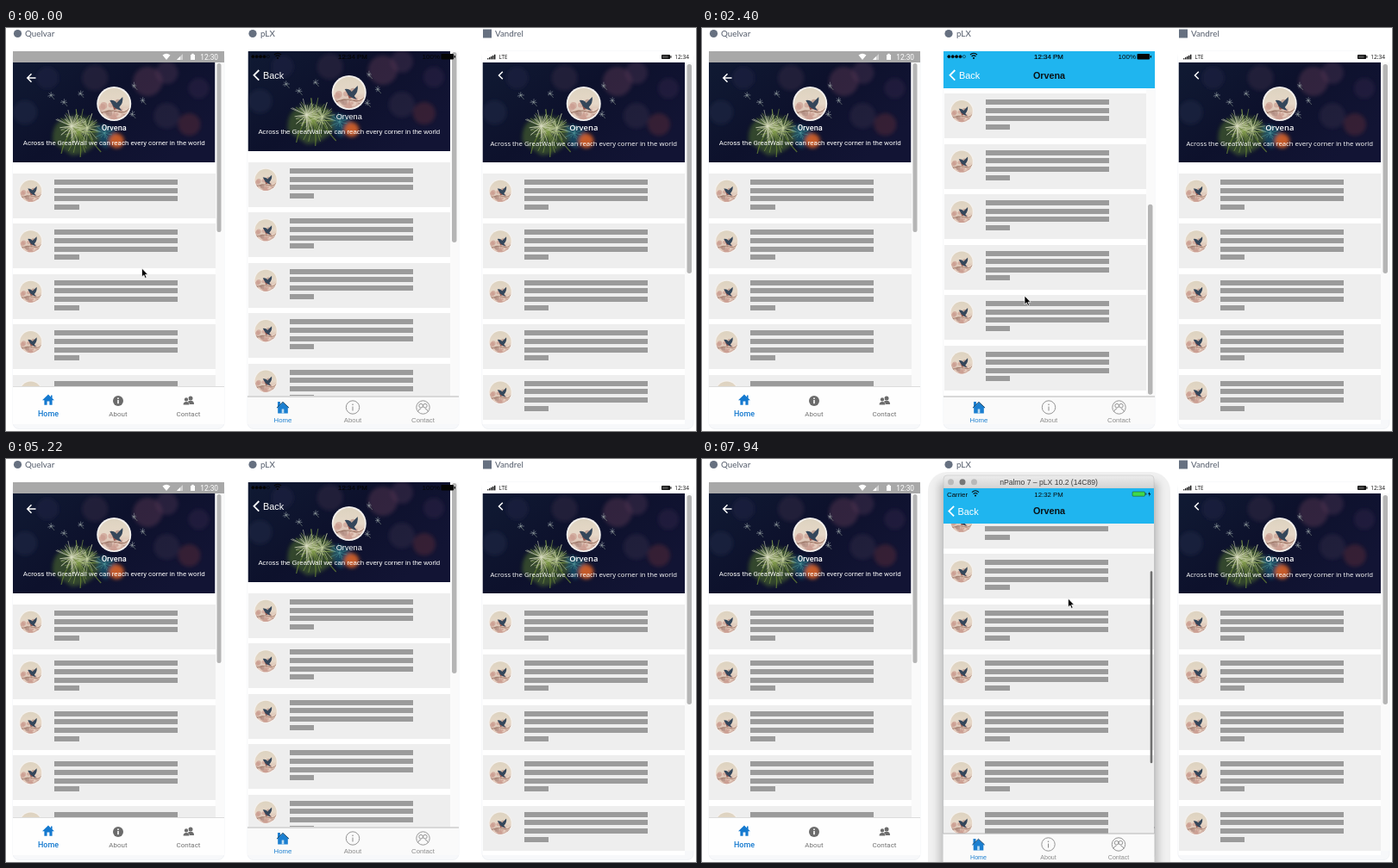
Write an HTML page that moves like this. It is 800 by 468 pixels and loops after 8000 ms.

```html
<!DOCTYPE html>
<html lang="en">
<head>
<meta charset="utf-8">
<title>Profile scroll on three platforms</title>
<style>
  html, body { margin: 0; width: 100%; height: 100%; overflow: hidden; background: #fff; }
  svg { display: block; width: 100vw; height: 100vh; }
  .sans { font-family: "Liberation Sans", Arial, sans-serif; }
  .robo { font-family: Roboto, sans-serif; }
  .open { font-family: "Open Sans", sans-serif; }
  .lato { font-family: Lato, sans-serif; }
</style>
</head>
<body>
<svg id="stage" viewBox="0 0 800 468" xmlns="http://www.w3.org/2000/svg"></svg>
<script>
const LOOP = 8000, STEP = 149, LAST = 53, PITCH = 58.45;
const NAME = 'Orvena';
const CAPTION = 'Across the GreatWall we can reach every corner in the world';

// Column geometry and key poses: [step, value]
const phones = [
  { id: 'a', x: 8, w: 234.5, left: 8, full: 245, top: 40, bottom: 416, font: 'robo', cap: 7.95, capY: 96.2, name: 9.2, weight: 500,
    bar: [40, 36], thumb: [244.5, 5, 41, 196, 0.532],
    scroll: [[2, 0], [3, 40], [4, 190], [5, 310], [6, 338], [7, 320], [8, 200], [9, 60], [10, 0]],
    tint: [[2, 0], [3, .3], [4, 1], [8, 1], [9, .8], [10, .38], [11, .12], [12, 0]] },
  { id: 'i', x: 280.5, w: 234.5, left: 280, full: 245, top: 27, bottom: 427, font: 'sans', cap: 7.85, capY: 96.2, name: 9.2, weight: 400,
    bar: [27, 43], thumb: [517, 5.5, 28, 221, 0.564],
    scroll: [[13, 0], [14, 90], [15, 240], [16, 313.5], [17, 313.5], [18, 290], [19, 180], [20, 60], [21, 0]],
    tint: [[13, 0], [14, .6], [15, 1], [19, 1], [20, .5], [21, 0]] },
  { id: 'w', x: 552.5, w: 234.5, left: 552, full: 245, top: 40, bottom: 460, font: 'open', cap: 7.75, capY: 97.2, name: 9.4, weight: 600,
    bar: [40, 36], thumb: [789.5, 5.5, 42, 243, 0.58],
    scroll: [[23, 0], [24, 2.6], [25, 70], [26, 190], [27, 270], [28, 294], [29, 294], [30, 270], [31, 190], [32, 100], [33, 40], [34, 10], [35, 0]],
    tint: [[24, 0], [25, .6], [26, 1], [32, 1], [33, .5], [34, .1], [35, 0]] },
  { id: 's', x: 280, w: 244, left: 280, full: 244, top: 34, bottom: 435, font: 'sans', cap: 7.62, capY: 96, name: 9.2, weight: 400,
    bar: [34, 41], thumb: [519.7, 2.6, 36, 223, 0.556],
    scroll: [[48, 0], [49, 12], [50, 60], [51, 115], [52, 150], [53, 169.5]],
    tint: [[48, 0], [49, .1], [50, .6], [51, 1]] }
];
const pointer = {
  x: [[0, 157.5], [10, 157.5], [11, 260], [12, 374], [21, 374], [22, 660], [29, 660], [35, 684], [36, 690], [42, 690], [43, 500], [45, 459], [48, 436], [53, 424.5]],
  y: [[0, 279], [1, 283], [10, 283], [11, 300], [12, 311], [21, 311], [22, 338], [29, 338], [34, 440], [35, 470], [42, 480], [43, 320], [45, 268], [48, 310], [53, 162]]
};

let seed = 7;
const rnd = () => (seed = seed * 16807 % 2147483647) / 2147483647;
const rect = (x, y, w, h, fill, more = '') => `<rect x="${x}" y="${y}" width="${w}" height="${h}" fill="${fill}" ${more}/>`;
const dot = (x, y, r, fill, more = '') => `<circle cx="${x}" cy="${y}" r="${r}" fill="${fill}" ${more}/>`;
const path = (d, fill, more = '') => `<path d="${d}" fill="${fill}" ${more}/>`;
const line = (d, color, width, more = '') => path(d, 'none', `stroke="${color}" stroke-width="${width}" ${more}`);
const text = (x, y, size, str, fill, font, more = '') =>
  `<text x="${x}" y="${y}" font-size="${size}" fill="${fill}" class="${font}" ${more}>${str}</text>`;
const mid = 'text-anchor="middle"';
const crisp = 'shape-rendering="crispEdges"';
const at = (x, y, inner, more = '') => `<g transform="translate(${x} ${y})" ${more}>${inner}</g>`;
const repeat = (n, fn) => Array.from({ length: n }, (_, k) => fn(k)).join('');

// Ring of short strokes, used for the flower head and the drifting seeds
const burst = (x, y, r, n, color, width, more = '') => line(repeat(n, k => {
  const a = k / n * Math.PI * 2 + rnd() * .4, q = r * (.5 + rnd() * .5);
  return `M${x} ${y}l${(Math.cos(a) * q).toFixed(1)} ${(Math.sin(a) * q).toFixed(1)}`;
}), color, width, more);

function photo() {
  const glow = (x, y, r, c, o) => dot(x, y, r, c, `opacity="${o}"`);
  const haze = glow(156, 22, 17, '#6a4058', .4) + glow(178, 12, 13, '#5a3a5c', .35) + glow(204, 72, 13, '#6b3038', .4) +
    glow(95, 18, 15, '#3c2c4c', .4) + glow(14, 58, 14, '#263250', .4) + glow(178, 62, 15, '#3a2c4c', .4) +
    glow(215, 30, 12, '#3a2d50', .35) + glow(40, 18, 13, '#2a2c4c', .35);
  const seeds = [[44, 38], [59, 46], [78, 36], [140, 27], [150, 44], [138, 60]]
    .map(([x, y]) => burst(x, y, 4.5, 7, '#c3cfcc', .6, 'opacity=".7"') + line(`M${x} ${y}l4 5`, '#8b9a8c', .5)).join('');
  return rect(0, 0, 234, 116, 'url(#night)') + `<g filter="url(#soft)">` + haze +
    path('M46 92Q44 64 72 62Q98 62 104 84Q92 106 68 108Z', '#4b6a2e', 'opacity=".6"') +
    path('M96 74Q112 70 122 84L108 100Q98 96 96 74Z', '#1f5a70', 'opacity=".7"') +
    dot(120, 91, 8.5, '#d86228', 'opacity=".9"') + dot(74, 76, 9, '#a9b277', 'opacity=".7"') + `</g>` +
    line('M74 78Q80 94 78 110M86 82Q94 96 102 104M66 82Q58 94 56 106', '#6d8a35', 1.3, 'opacity=".7"') +
    burst(76, 80, 27, 26, '#7d9848', .8, 'opacity=".8"') + burst(68, 74, 20, 30, '#d8dcc0', .7, 'opacity=".8"') +
    burst(86, 76, 18, 24, '#c4cfa0', .7, 'opacity=".8"') + burst(106, 82, 12, 12, '#4f9297', .8, 'opacity=".7"') + seeds;
}

// Round picture drawn at radius 20
const avatar = () => dot(0, 0, 20, '#f4f1ee') + dot(0, 0, 18.2, 'url(#blush)') +
  `<g clip-path="url(#disc)">` +
  repeat(22, k => dot((rnd() * 36 - 18).toFixed(1), (rnd() * 19 - 2).toFixed(1), (1.5 + rnd() * 2.5).toFixed(1), ['#c99a8e', '#ecd6c6', '#b08a80'][k % 3], 'opacity=".65"')) +
  line('M-18 12Q-5 6 4 9T18 5', '#96705f', 1) + `</g>` +
  path('M-5 -4Q0 -5 3 -1L10 -8Q11 -1 6 4L9 8L3 6Q-1 5 -2 1Z', '#34465a') + path('M-2 1Q0 5 4 6L0 7Z', '#93554e');

const row = () => `<g transform="translate(20.7 20.3) scale(.69)"><use href="#avatar"/></g>` +
  repeat(4, k => rect(48.3, 7 + k * 9.6, k < 3 ? 143 : 28.5, 6, '#9b9b9b', crisp));

const wifi = (x, y, c) => line(`M${x - 4} ${y - 2}q4 -3.6 8 0M${x - 2.4} ${y}q2.4 -2.2 4.8 0`, c, 1.1) + dot(x, y + 1.9, 1, c);
const chevron = (x, y, h, c, width) => line(`M${x + h} ${y - h}L${x} ${y}L${x + h} ${y + h}`, c, width);
const house = c => path('M0 -6.5L-7 .2H-4.6V5.8H-1.4V1.5H1.4V5.8H4.6V.2H7L4.6 -2.1V-5.6H3V-3.6Z', c);
const person = (x, c) => dot(x, -2.6, 2.5, c) + path(`M${x - 4} 4.5Q${x - 4} .3 ${x} .3T${x + 4} 4.5Z`, c);

function flatNav() {
  const y = 432, gray = '#6b6b6b';
  return rect(8, 416, 245, 44, '#fefefe') + rect(8, 416, 245, 1, '#dcdcdc') +
    at(49, y, house('#1479cf')) +
    at(130, y + 1, dot(0, 0, 6, gray) + rect(-.8, -1, 1.6, 4.2, '#fff') + dot(0, -2.8, .9, '#fff')) +
    at(211.5, y + .5, person(2.5, gray) + at(-2.5, 1.2, person(0, '#fff') + `<g transform="scale(.86)">${person(0, gray)}</g>`)) +
    text(49, 450.5, 9, 'Home', '#1479cf', 'robo', mid + ' font-weight="500"') +
    text(130, 450.5, 8, 'About', '#747474', 'robo', mid) + text(211.5, 450.5, 8, 'Contact', '#747474', 'robo', mid);
}

function lineNav(x, y, size, end) {
  const gray = '#8a8a8a', ring = `stroke="${gray}" stroke-width=".9"`;
  const half = k => dot(k * 2.4, -1.8, 2.3, 'none', ring) + line(`M${k * 6} 5Q${k * 5} 2 ${k * 2.4} 1.4`, gray, .9);
  const labels = ['Home', 'About', 'Contact'];
  return rect(x, y, 245, end - y, '#fafafa') + rect(x, y - .5, 245, 1, '#b8b8b8') +
    at(x + 41, y + 12.5, path('M-6 -6.5H-3V-3L0 -6L7.5 .8H5.8V7H-5.8V.8H-7.5L-6 -.6Z', '#1b7fd0') +
      line('M-7 .4L0 -6.2L7 .4', '#28506f', 1) + rect(-1.3, 2, 2.6, 5, '#bcdcf2')) +
    at(x + 122, y + 12.5, dot(0, 0, 7.7, 'none', ring) + rect(-.5, -1, 1, 5, gray) + dot(0, -3.2, .8, gray)) +
    at(x + 203.5, y + 12.5, dot(0, 0, 7.7, 'none', ring) + half(-1) + half(1)) +
    labels.map((s, k) => text(x + [41, 122, 203.5][k], y + 30, size, s, k ? '#8c8c8c' : '#1b7fd0', 'sans', mid)).join('');
}

function status(id) {
  if (id === 'a') return rect(8, 27, 245, 13, '#a8a8a8') +
    path('M181.5 31.5Q186 28 190.5 31.5L186 37Z', '#fff') + path('M198 37L205 30V37Z', '#d0d0d0') + path('M198 37L202 33V37Z', '#fff') +
    rect(214, 31, 5, 6, '#fff') + rect(215.3, 29.8, 2.4, 2, '#fff') +
    text(246, 36.6, 8.3, '12:30', '#fff', 'robo', 'text-anchor="end"') +
    line('M34.5 58H25M29.5 53.3L24.8 58L29.5 62.7', '#fff', 1.5);
  if (id === 'i') return repeat(5, k => dot(286.3 + k * 4.4, 33.2, 1.6, k < 4 ? '#050505' : 'none', 'stroke="#050505" stroke-width=".5"')) +
    wifi(315, 33, '#050505') + text(402, 36, 7.9, '12:34 PM', '#050505', 'sans', mid + ' stroke="#050505" stroke-width=".15"') +
    text(503, 36, 8, '100%', '#050505', 'sans', 'text-anchor="end"') +
    rect(504.5, 30, 14.5, 6.5, '#050505', 'rx="1"') + rect(519.7, 32, 1.3, 2.6, '#050505') +
    chevron(287.5, 54.8, 5.8, '#fff', 1.8) + text(298, 58.6, 10.9, 'Back', '#fff', 'sans');
  if (id === 'w') return rect(552, 27, 245, 13, '#fff') +
    repeat(5, k => rect(558 + k * 2, 35.2 - k * 1.1, 1.4, 1.2 + k * 1.1, '#111')) +
    text(571.5, 36, 6.2, 'LTE', '#111', 'open') +
    rect(760, 31, 10, 5, '#111', 'rx=".8"') + rect(770.3, 32.3, 1.2, 2.4, '#111') + rect(761, 32, 6.6, 3, '#444') +
    text(792, 36, 6.6, '12:34', '#111', 'open', 'text-anchor="end"') + chevron(571.5, 55, 4.3, '#fff', 1.5);
  return text(284, 43.6, 7.9, 'Carrier', '#080808', 'sans') + wifi(317, 40.6, '#080808') +
    text(402, 43.6, 7.8, '12:32 PM', '#080808', 'sans', mid) +
    rect(499, 38, 14.5, 5.2, '#40d84b', 'rx=".9" stroke="#163c22" stroke-width=".5"') + rect(514.3, 39.5, 1, 2.2, '#163c22') +
    path('M519 37.7l-1.8 3.4h1.5l-.7 2.6 2.4 -3.5h-1.5z', '#080808') +
    chevron(286.3, 60.6, 5.8, '#fff', 1.8) + text(296.5, 64.6, 10.9, 'Back', '#fff', 'sans');
}

function title(p) {
  const y = p.bar[0] + p.bar[1];
  const centred = p.id === 'i' || p.id === 's';
  return centred ? text(402.5, y - 11.2, 10.8, NAME, '#0a1216', 'sans', mid + ' font-weight="700"')
    : text(p.x + 48, y - 14, 11, NAME, '#fff', p.font, 'font-weight="500"');
}

function screen(p) {
  const cx = p.x + p.w / 2, list = p.top + 129;
  const [tx, tw, ty, th] = p.thumb;
  return `<clipPath id="clip-${p.id}">${rect(p.left, p.top, p.full, p.bottom - p.top, '#000')}</clipPath>` +
    `<g clip-path="url(#clip-${p.id})">` + rect(p.x, p.top, p.w, p.bottom - p.top, '#fff') +
    `<g id="body-${p.id}">` + at(p.x, p.top, `<g transform="scale(${p.w / 234} 1)"><use href="#photo"/></g>`) +
    at(cx, p.top + 48, '<use href="#avatar"/>') +
    text(cx, p.top + 79, p.name, NAME, '#fff', p.font, `${mid} font-weight="${p.weight}"`) +
    text(cx, p.top + p.capY, p.cap, CAPTION, '#fff', p.font, mid) +
    repeat(10, k => at(p.x, list + k * PITCH, rect(0, 0, p.w, 52, '#eee', crisp) + '<use href="#row"/>')) + `</g>` +
    rect(tx, ty, tw, th, p.id === 's' ? '#6f6f6f' : '#b5b5b5', `id="thumb-${p.id}" rx="${tw / 2}"`) +
    `<g id="tint-${p.id}">${rect(p.left, p.bar[0], p.full, p.bar[1], '#1fb5ef')}</g></g>` +
    `<g id="title-${p.id}">${title(p)}</g>` + status(p.id);
}

const card = x => rect(x, 27, 245, 438.5, '#f7f8fa', 'rx="7" stroke="#f1f3f6"') + rect(x, 27, 245, 428, '#fafafa');
const label = (x, str) => text(x, 10.2, 9.8, str, '#5f6775', 'lato', 'font-weight="500"');
const [droid, fruit, pane, sim] = phones;

document.getElementById('stage').innerHTML = `<defs>
  <linearGradient id="night" x1="0" x2="1" y2=".6"><stop stop-color="#101a33"/><stop offset=".5" stop-color="#0d112c"/><stop offset="1" stop-color="#121434"/></linearGradient>
  <linearGradient id="blush" x2="0" y2="1"><stop stop-color="#ddd3c0"/><stop offset=".5" stop-color="#e6d8c8"/><stop offset="1" stop-color="#cda69a"/></linearGradient>
  <linearGradient id="chrome" x2="0" y2="1"><stop stop-color="#ececec"/><stop offset="1" stop-color="#d4d4d4"/></linearGradient>
  <filter id="soft" x="-10%" y="-10%" width="120%" height="120%"><feGaussianBlur stdDeviation="2.2"/></filter>
  <filter id="shade" x="-20%" y="-20%" width="140%" height="140%"><feGaussianBlur stdDeviation="5"/></filter>
  <clipPath id="disc"><circle r="18.2"/></clipPath>
  <clipPath id="frame">${rect(0, 0, 234, 116, '#000')}</clipPath>
  <g id="photo" clip-path="url(#frame)">${photo()}</g><g id="avatar">${avatar()}</g><g id="row">${row()}</g>
</defs>` + rect(0, 0, 800, 468, '#fff') +
  dot(13.5, 6.5, 4.6, '#667080') + label(22, 'Quelvar') +
  dot(286, 6.5, 4.6, '#667080') + label(295, 'pLX') +
  rect(553, 1.5, 10, 10, '#667080') + label(567, 'Vandrel') +
  card(8) + card(280) + card(552) +
  screen(droid) + flatNav() +
  screen(fruit) + lineNav(280, 428, 7.8, 460) +
  screen(pane) +
  `<g id="window">` + rect(262, 15, 281, 490, '#000', 'rx="22" opacity=".06"') +
  rect(275, 27, 254, 480, '#000', 'opacity=".2" filter="url(#shade)"') +
  path('M280 34V23Q280 19 284 19H520Q524 19 524 23V34Z', 'url(#chrome)', 'stroke="#bdbdbd" stroke-width=".5"') +
  dot(288.5, 26.7, 3.5, '#b9b9b9') + dot(302, 26.7, 3.5, '#777') + dot(315.5, 26.7, 3.5, '#b9b9b9') +
  text(402, 29.8, 8.6, 'nPalmo 7 – pLX 10.2 (14C89)', '#3c3c3c', 'sans', mid) +
  screen(sim) + lineNav(279.5, 435, 7.1, 468) + `</g>` +
  `<g id="pointer">${path('M0 0V10L2.3 7.9L3.9 11.5L5.5 10.8L4 7.3H7Z', '#000', 'stroke="#fff" stroke-width=".7"')}</g>`;

const el = id => document.getElementById(id);

function value(keys, i) {
  if (i <= keys[0][0]) return keys[0][1];
  for (let k = 1; k < keys.length; k++) {
    const [a, u] = keys[k - 1], [b, v] = keys[k];
    if (i <= b) return u + (v - u) * (i - a) / (b - a);
  }
  return keys[keys.length - 1][1];
}

function draw(ms) {
  const i = Math.min(LAST, Math.floor(ms / STEP));
  for (const p of phones) {
    const s = value(p.scroll, i), tint = value(p.tint, i);
    el('body-' + p.id).setAttribute('transform', `translate(0 ${-s})`);
    el('thumb-' + p.id).setAttribute('y', p.thumb[2] + s * p.thumb[4]);
    el('tint-' + p.id).setAttribute('opacity', tint);
    el('title-' + p.id).setAttribute('opacity', tint > .55 ? 1 : 0);
  }
  el('thumb-s').setAttribute('opacity', value(sim.scroll, i) > 0 ? 1 : 0);
  el('window').setAttribute('visibility', i >= 43 ? 'visible' : 'hidden');
  el('pointer').setAttribute('transform', `translate(${value(pointer.x, i)} ${value(pointer.y, i)})`);
}

const start = performance.now();
function tick() {
  draw((performance.now() - start) % LOOP);
  requestAnimationFrame(tick);
}
tick();
</script>
</body>
</html>
```
